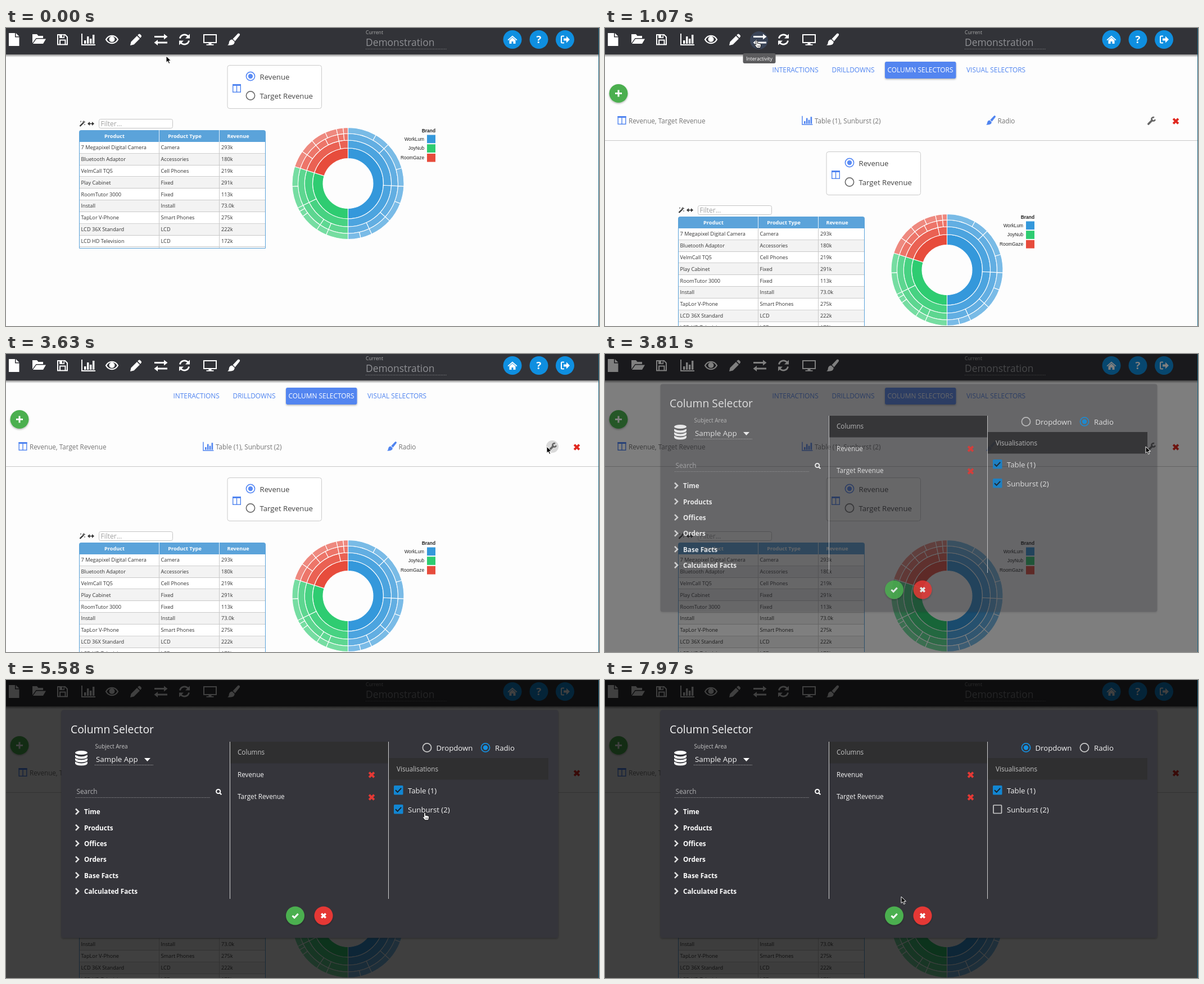
Recreate the animation shown at these times as an HTML page. Size 1055 by 531 pixels, loop 8000 ms.

```html
<!DOCTYPE html>
<html lang="en">
<head>
<meta charset="utf-8">
<title>Column selector</title>
<style>
html, body { margin: 0; width: 100%; height: 100%; overflow: hidden; background: #fdfdfd; }
svg { display: block; width: 1055px; height: 531px; font-family: "Open Sans", sans-serif; }
text { white-space: pre; }
</style>
</head>
<body>
<svg id="stage" viewBox="0 0 1055 531"></svg>
<script>
const LOOP = 8000;
const BLUE = '#4f84f0', GREEN = '#4caf50', RED = '#e53935', SKY = '#0f8fe0';

const text = (x, y, s, size, fill, extra = '') =>
  `<text x="${x}" y="${y}" font-size="${size}" fill="${fill}" ${extra}>${s}</text>`;
const rect = (x, y, w, h, fill, extra = '') =>
  `<rect x="${x}" y="${y}" width="${w}" height="${h}" fill="${fill}" ${extra}/>`;
const disc = (x, y, r, fill, extra = '') =>
  `<circle cx="${x}" cy="${y}" r="${r}" fill="${fill}" ${extra}/>`;
const shape = (d, fill, extra = '') => `<path d="${d}" fill="${fill}" ${extra}/>`;
const line = (d, color, w = 1, extra = '') =>
  `<path d="${d}" fill="none" stroke="${color}" stroke-width="${w}" ${extra}/>`;
const group = (id, body, extra = '') => `<g id="${id}" ${extra}>${body}</g>`;
const at = (x, y, body, scale = 1) => `<g transform="translate(${x} ${y}) scale(${scale})">${body}</g>`;
const BOLD = 'font-weight="700"', MID = 'text-anchor="middle"';
const dots = (x, y, w, color) => line(`M${x} ${y}h${w}`, color, 1, 'stroke-dasharray="1 1.5"');

const cross = (x, y, color, r = 4.4, w = 3.9) =>
  line(`M${x - r} ${y - r}l${2 * r} ${2 * r}M${x + r} ${y - r}l${-2 * r} ${2 * r}`, color, w);
const plus = (x, y) => line(`M${x - 6} ${y}h12M${x} ${y - 6}v12`, '#fff', 3);
const tick = (x, y, color, w) => line(`M${x - 5} ${y}l3.6 3.6 6.6-7`, color, w);
const radio = (x, y, on, onColor, offColor) =>
  disc(x, y, 7.6, 'none', `stroke="${on ? onColor : offColor}" stroke-width="1.7"`) +
  (on ? disc(x, y, 4.2, onColor) : '');

const chartIcon = c => line('M135 10v20h24', c, 1.9) +
  [[139, 6], [144, 13], [149, 9], [154, 16]].map(([x, h]) => rect(x, 28 - h, 3.4, h, c)).join('');
const brushIcon = c =>
  shape('M415 10q2 1 .5 3.5l-8 10-4-4 8.5-9q1.5-1.5 3-.5z', c) +
  shape('M402.5 20.5l4.2 4q.3 7.5-12.7 6 2.7-1 2.7-4.5 .8-5.5 5.8-5.5z', c);
const columnIcon = (x, y) =>
  rect(x + .7, y + .7, 13.6, 13.6, 'none', `stroke="${BLUE}" stroke-width="1.4"`) +
  rect(x, y, 15, 3, BLUE) + line(`M${x + 7.5} ${y}v15`, BLUE, 1.4);

function header() {
  const w = '#fff';
  return rect(0, 0, 1055, 47, '#323338') + rect(0, 47, 1055, 5, 'url(#fade)') +
    disc(274, 22, 16, '#3b4558', 'id="ripple"') +
    shape('M5 9h11v7.5h7.5V32H5zM17.5 9l6 6h-6z', w) +
    shape('M47 11h8l2.5 3H66v4H53.5L47 27zM54 19.5h17l-5 8.5H48z', w) +
    line('M92 12h13l4 4v13.5H92z', w, 2) + rect(95, 11, 9, 7, w) + rect(100, 12.5, 2.5, 4, '#323338') +
    line('M96 29v-7.5h9.5V29', w, 2) + chartIcon(w) +
    line('M178 20.5c5-9 16-9 21 0c-5 9-16 9-21 0z', w, 2.2) + disc(188.5, 20, 5, w) +
    shape('M221 31l1.5-6.5L233 14l5 5-10.5 10.5zM234.2 12.8l1.8-1.8q1.5-1 3 .5l1.5 1.5q1.3 1.5 0 3l-1.5 1.7z', w) +
    shape('M264 14h17v-3.5l6.5 5-6.5 5V17h-17zM287 24.5h-17V21l-6.5 5 6.5 5v-3.5h17z', w) +
    line('M309.5 18.5a8.2 8.2 0 0 1 14.5-3.5M325.5 22.5a8.2 8.2 0 0 1-14.5 3.5', w, 2.8) +
    shape('M327 10.5v8h-8zM308 30.5v-8h8z', w) +
    rect(352, 12, 22, 14, 'none', 'stroke="#fff" stroke-width="2"') +
    shape('M360.5 26h5v3h4v1.8h-13V29h4z', w) + brushIcon(w) +
    text(640, 10.5, 'Current', 8.7, '#aaa') + text(640, 32, 'Demonstration', 17.4, '#8f9094') +
    dots(640, 37.5, 145, '#8a8b8e') +
    [901, 948, 994.5].map(x => disc(x, 20.5, 16.5, SKY)).join('') +
    shape('M901 13.5l8.5 7.5-1.2 1.3-7.3-6.3-7.3 6.3-1.2-1.3zM895.5 21.8l5.5-4.7 5.5 4.7V28h-4v-4h-3v4h-4z', w) +
    text(948, 27, '?', 18.5, w, BOLD + ' ' + MID) +
    line('M993 14.5h-3.5q-1.5 0-1.5 1.5v9q0 1.5 1.5 1.5h3.5', w, 2) +
    shape('M992 18.5h5V14.5l6 6-6 6v-4h-5z', w);
}

function panel() {
  const tab = (x, s, c = BLUE) => text(x, 79.3, s, 11.9, c);
  const label = (x, s) => text(x, 170, s, 11.7, '#747474');
  return rect(498, 60, 126.5, 30, '#5385f0', 'rx="3" filter="url(#soft)"') +
    tab(297.5, 'INTERACTIONS') + tab(403.5, 'DRILLDOWNS') +
    tab(502.5, 'COLUMN SELECTORS', '#fff') + tab(643, 'VISUAL SELECTORS') +
    disc(24, 116.5, 16.5, GREEN, 'filter="url(#soft)"') + plus(24, 116.5) +
    columnIcon(22.5, 157) + label(42, 'Revenue, Target Revenue') +
    at(247, 149, chartIcon(BLUE), .77) + label(373, 'Table (1), Sunburst (2)') +
    at(374.6, 148.7, brushIcon(BLUE), .77) + label(698.5, 'Radio') +
    disc(972, 165, 11, '#d9d9d9', 'id="hover"') +
    line('M966.8 171l6.5-6.5', '#666', 3.6, 'stroke-linecap="round"') +
    line('M977 159.5a3.2 3.2 0 1 0 1.7 3.5', '#666', 2.6) +
    cross(1015.5, 166, '#e0281f') + line('M0 200.5h1055', '#c8c8c8');
}

function table() {
  const rows = [
    ['7 Megapixel Digital Camera', 'Camera', '293k'], ['Bluetooth Adaptor', 'Accessories', '180k'],
    ['VelmCall TQ5', 'Cell Phones', '219k'], ['Play Cabinet', 'Fixed', '291k'],
    ['RoomTutor 3000', 'Fixed', '113k'], ['Install', 'Install', '73.0k'],
    ['TapLor V-Phone', 'Smart Phones', '275k'], ['LCD 36X Standard', 'LCD', '222k'],
    ['LCD HD Television', 'LCD', '172k']];
  const edge = '#5ba3da', cols = [133.5, 275.5, 383];
  let out = rect(130.5, 190, 331, 203, '#fff');
  rows.forEach((row, i) => {
    const y = 203 + i * 20.83;
    if (i % 2) out += rect(131, y, 330, 20.83, '#f3f3f3');
    out += line(`M131 ${Math.round(y + 20.83) - .5}h330`, '#c9c9c9');
    row.forEach((s, k) => out += text(cols[k], y + 13.2, s, 9.2, '#333'));
  });
  out += rect(131, 391, 330, 2, '#f3f3f3') + line('M272.5 203v190M379.5 203v190', '#c9c9c9') +
    line('M130.5 190v202.5h331V190', edge) +
    shape('M130 203v-17q0-4 4-4h324q4 0 4 4v17z', edge) + line('M272.5 182v21M379.5 182v21', '#e4f0fa');
  [[193, 'Product'], [318, 'Product Type'], [413, 'Revenue']].forEach(([x, s]) =>
    out += text(x, 196, s, 9.15, '#fff', BOLD + ' ' + MID));
  return out + rect(165.5, 162.5, 131, 16, '#fff', 'rx="3" stroke="#c4c4c4"') +
    text(168.5, 175, 'Filter...', 12, '#a0a0a0') +
    line('M131.5 175l6-6', '#333', 2.4) + line('M138.5 165v5M136 167.5h5M133 165.5v2.5M140 171v2', '#333') +
    line('M147 170.5h8', '#333', 1.6) + shape('M145 170.5l4-3.5v7zM157 170.5l-4-3.5v7z', '#333');
}

function sunburst() {
  const R = 99.5, brands = [
    ['#3498db', 0, 180, [], [93], [46, 93, 132, 155], [30, 46, 74, 93, 111, 132, 155, 167]],
    ['#2ecc71', 180, 287.6, [], [244], [203, 214, 244], [203, 214, 234, 240, 244, 267]],
    ['#e74c3c', 287.6, 360, [], [348], [305, 320, 333, 348, 355], [305, 320, 336, 348, 355]]];
  const pt = (r, a) => {
    const q = a * Math.PI / 180;
    return (608.5 + r * Math.sin(q)).toFixed(2) + ' ' + (277 - r * Math.cos(q)).toFixed(2);
  };
  const slice = (r0, r1, a, b) => {
    const big = b - a > 180 ? 1 : 0;
    return `M${pt(r0, a)}L${pt(r1, a)}A${r1} ${r1} 0 ${big} 1 ${pt(r1, b)}L${pt(r0, b)}A${r0} ${r0} 0 ${big} 0 ${pt(r0, a)}z`;
  };
  let out = '';
  for (const [color, from, to, ...rings] of brands)
    rings.forEach((cuts, k) => {
      // equal-area rings
      const r0 = R * Math.sqrt((k + 1) / 5), r1 = R * Math.sqrt((k + 2) / 5);
      const stops = [from, ...cuts, to];
      for (let i = 1; i < stops.length; i++)
        out += shape(slice(r0, r1, stops[i - 1], stops[i]), color,
          `fill-opacity="${[1, .88, .77, .65][k]}" stroke="#fff" stroke-width="1.1"`);
    });
  const sans = 'font-family="Liberation Sans, sans-serif" text-anchor="end"';
  out += text(764, 186, 'Brand', 8.4, '#222', sans + ' ' + BOLD);
  ['WorkLum', 'JoyNub', 'RoomGaze'].forEach((s, i) => {
    out += text(744, 200.5 + i * 16.7, s, 8.3, '#222', sans) +
      rect(749, 190.5 + i * 16.7, 15, 14.7, brands[i][0]);
  });
  return out;
}

function selector() {
  return rect(394, 66.5, 167.5, 77, '#fff', 'rx="4" stroke="#cacaca"') + columnIcon(403, 100) +
    radio(435, 86, true, '#5b8cf5') + radio(435, 120.5, false, '', '#707070') +
    text(451.5, 91.7, 'Revenue', 13.2, '#444') + text(451.5, 125.7, 'Target Revenue', 13.2, '#444');
}

function dialog() {
  const w = '#f4f4f4', g = '#c4c4c4', bar = '#2f2f30';
  let out = text(115, 95, 'Column Selector', 19.3, w);
  for (let i = 0; i < 4; i++) {
    const y = 129.5 + i * 6;
    out += i ? shape(`M123 ${y - 2}q11 6 22 0v3q-1 4-11 4t-11-4z`, '#fff')
      : `<ellipse cx="134" cy="${y}" rx="11" ry="3.6" fill="#fff"/>`;
  }
  out += text(158.5, 122, 'Subject Area', 10, g) + text(160, 146, 'Sample App', 13.4, w) +
    shape('M246 139h11l-5.5 6z', '#fff') + dots(158, 151.5, 104, g) +
    text(125.5, 203, 'Search', 11.8, '#b0b0b2') + dots(124, 209.5, 240, '#a5a5a7') +
    disc(377.7, 198.5, 3.6, 'none', 'stroke="#fff" stroke-width="2"') + line('M380.3 201.3l3 3', '#fff', 2.2);
  ['Time', 'Products', 'Offices', 'Orders', 'Base Facts', 'Calculated Facts'].forEach((s, i) => {
    const y = 235 + i * 28.35;
    out += line(`M124 ${y - 5.5}l5 5-5 5`, '#e2e2e2', 2.6) + text(139, y + 4.3, s, 11.7, '#fff', BOLD);
  });
  return out + rect(399, 110, 281, 38.5, bar) + rect(681, 139, 284, 38.5, bar) +
    line('M398.5 110v280M680.5 110v280', '#d0d0d0') +
    text(412, 133, 'Columns', 11.7, g) + text(695, 162.5, 'Visualisations', 11.7, g) +
    text(412, 172.5, 'Revenue', 11.7, w) + text(412, 212.3, 'Target Revenue', 11.7, w) +
    cross(650.5, 169, RED) + cross(650.5, 209, RED) +
    text(765.5, 126, 'Dropdown', 13.2, w) + text(870, 126, 'Radio', 13.2, w) +
    text(715, 202, 'Table (1)', 13.2, w) + text(715, 236, 'Sunburst (2)', 13.2, w) +
    group('choice', '') +
    disc(514.5, 420, 16.5, GREEN, 'filter="url(#soft)"') + tick(514.5, 420, '#fff', 3) +
    disc(565, 420, 16.5, RED, 'filter="url(#soft)"') + cross(565, 420, '#fff', 3.8, 3.6);
}

const checkbox = (y, on) => on
  ? rect(690, y, 16.5, 16.5, '#1286d2', 'rx="1.5"') + tick(698, y + 8.3, '#16212b', 2)
  : rect(691, y + 1, 14.5, 14.5, 'none', 'rx="1" stroke="#c9c9c9" stroke-width="1.7"');
const choices = (dropdown, both) =>
  radio(749, 120.5, dropdown, '#1590e0', '#c9c9c9') + radio(853, 120.5, !dropdown, '#1590e0', '#c9c9c9') +
  checkbox(188, true) + checkbox(222, both);

const arrow = shape('M0 0v11.5l2.7-2.4 2 4.4 2-.9-1.9-4.3h3.7z', '#000', 'stroke="#fff" stroke-linejoin="round"');
const hand = shape('M-1.4 1.2q1.4-2 2.8 0V5.5q1.5-.8 2.3.3 1.5-.7 2.2.6 1.6-.3 1.7 1.2v2.4q-.5 2-1.4 3.8h-6q-1.5-2.8-3.9-5-.6-1.5 1-1.4l1.3 1z', '#fff', 'stroke="#000" stroke-width=".9" stroke-linejoin="round"') +
  line('M1.7 9v2.8M3.6 9v2.8M5.3 9v2.8', '#000', .6);

// time, x, y, hand
const steps = [
  [0, 285, 50], [140, 283, 45], [300, 278, 34], [460, 271, 24, 1], [620, 270, 22, 1],
  [1550, 318, 58], [1700, 416, 111], [2000, 601, 136], [2300, 854, 144], [2600, 885, 150],
  [2750, 917, 156], [2900, 941, 161], [3050, 956, 164], [3190, 962, 165], [4020, 911, 183],
  [4230, 856, 187], [4400, 809, 188], [4550, 786, 189], [4850, 768, 196], [5000, 754, 203],
  [5140, 746, 208], [5440, 745, 225, 1], [5580, 745, 236, 1], [5880, 762, 192], [6030, 784, 141],
  [6180, 792, 121, 1], [6780, 765, 175], [6920, 740, 234, 1], [7070, 733, 223, 1],
  [7520, 690, 262], [7670, 620, 325], [7820, 552, 372], [7970, 527, 386]];

const stage = document.getElementById('stage');
stage.innerHTML = `<defs>
  <linearGradient id="fade" x2="0" y2="1"><stop stop-color="#000" stop-opacity=".45"/><stop offset="1" stop-color="#000" stop-opacity="0"/></linearGradient>
  <filter id="soft" x="-20%" y="-20%" width="140%" height="150%"><feDropShadow dx="0" dy="1.5" stdDeviation="1.5" flood-opacity=".3"/></filter>
  </defs>` +
  rect(0, 0, 1055, 531, '#fdfdfd') + group('body', selector() + table() + sunburst()) +
  group('panel', panel()) + header() +
  group('tip', rect(245.5, 45, 58, 18, '#5c5c5e', 'rx="3"') + text(274.5, 57.5, 'Interactivity', 8.6, '#fff', MID)) +
  rect(0, 0, 1055, 531, '#000', 'id="dim"') +
  rect(98.5, 53.5, 884, 406, '#34353a', 'id="box" rx="4" filter="url(#soft)"') +
  group('dialog', dialog()) +
  rect(1054, 0, 1, 531, '#1c6480') + group('arrow', arrow) + group('hand', hand);

const part = {};
stage.querySelectorAll('g[id], circle[id], rect[id]').forEach(e => part[e.id] = e);
const show = (id, on) => part[id].setAttribute('visibility', on ? 'visible' : 'hidden');
const fade = (id, v) => part[id].setAttribute('opacity', v);
let lastChoice = '';

function draw(t) {
  const open = t >= 1070, phase = t < 3810 ? 0 : t < 4020 ? 1 : 2;
  part.body.setAttribute('transform', `translate(0 ${open ? 154 : 0})`);
  part.panel.setAttribute('display', open ? 'inline' : 'none');
  show('ripple', open && t < 1220);
  show('tip', t >= 620 && t < 1550);
  show('hover', t >= 3490 && t < 3810);
  fade('dim', [0, .5, .75][phase]);
  fade('box', [0, .32, 1][phase]);
  fade('dialog', [0, .85, 1][phase]);

  const choice = choices(t >= 6480, t < 7070);
  if (choice !== lastChoice) part.choice.innerHTML = lastChoice = choice;

  let now = steps[0];
  for (const s of steps) if (s[0] <= t) now = s;
  const [, x, y, pointing] = now;
  for (const id of ['arrow', 'hand']) part[id].setAttribute('transform', `translate(${x} ${y})`);
  show('arrow', !pointing);
  show('hand', pointing);
}

const start = performance.now();
function tickFrame() {
  draw((performance.now() - start) % LOOP);
  requestAnimationFrame(tickFrame);
}
draw(0);
requestAnimationFrame(tickFrame);
</script>
</body>
</html>
```
